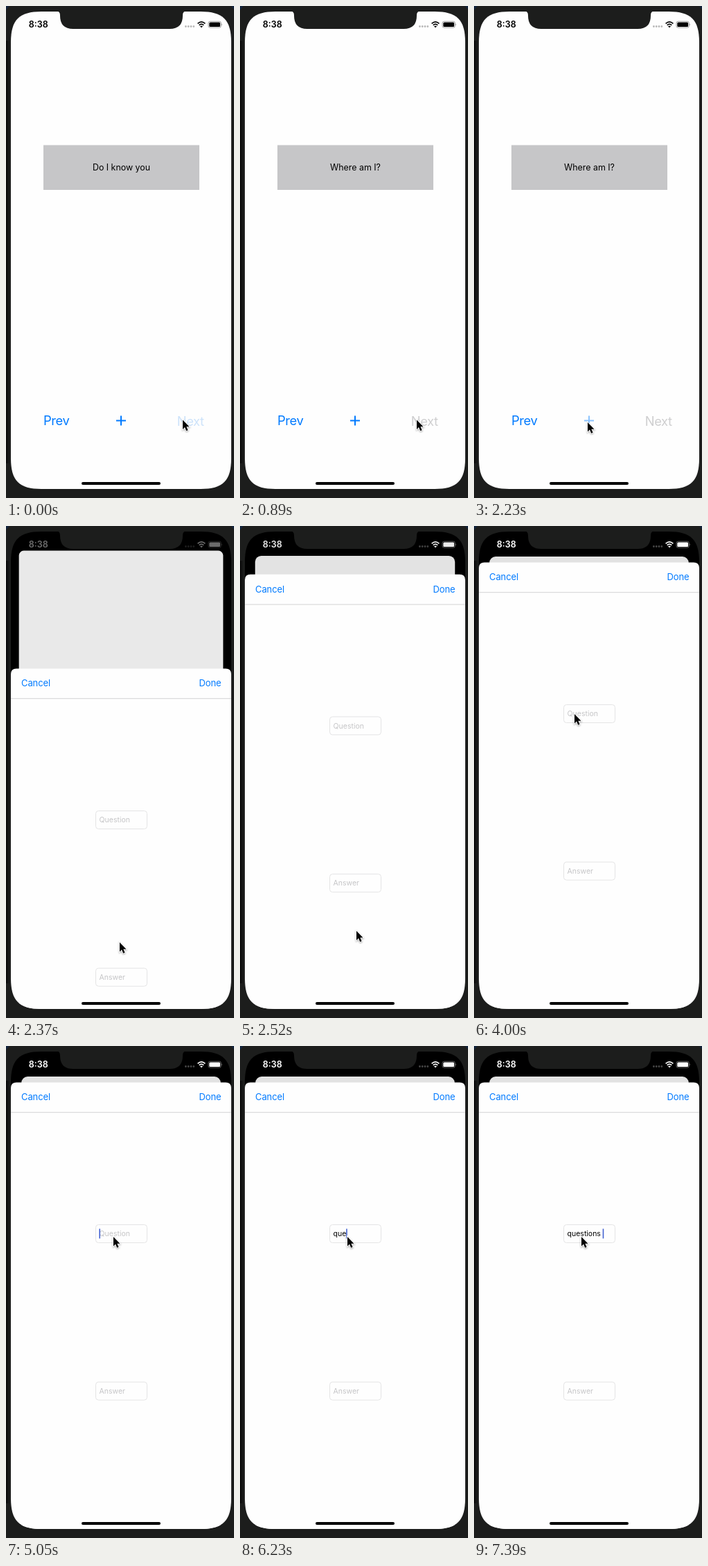
Animation of 329x709 px, one loop 7990 ms. Source, as an HTML page:

```html
<!DOCTYPE html>
<html lang="en">
<head>
<meta charset="utf-8">
<title>Flash cards</title>
<style>
  html, body { margin: 0; width: 100%; height: 100%; overflow: hidden; background: #1c1d1c; }
  svg { display: block; width: 100vw; height: 100vh; }
  text { font-family: Inter, Roboto, sans-serif; white-space: pre; }
  .link { fill: #007aff; }
  .big { font-size: 18.4px; letter-spacing: -.4px; }
  .bar { font-size: 13px; letter-spacing: -.1px; }
  .field { font-size: 10.5px; }
  .hint { fill: #c5c5c7; }
  .box { fill: #fefefe; stroke: #e4e4e5; }
  #pointer { filter: drop-shadow(0 1px 1px rgba(0, 0, 0, .35)); }
</style>
</head>
<body>
<svg viewBox="0 0 329 709">
  <defs>
    <clipPath id="screen"><path d="M7 52C7 20 19 8 51 8H281C313 8 325 20 325 52V652C325 684 313 696 281 696H51C19 696 7 684 7 652Z"/></clipPath>
    <linearGradient id="edge"><stop stop-color="#080808"/><stop offset="1" stop-color="#1c1d1c"/></linearGradient>
  </defs>
  <rect width="329" height="709" fill="#1c1d1c"/>
  <rect y="50" width="5" height="609" fill="url(#edge)"/>
  <path d="M0 0H5L0 6ZM329 0H325L329 5Z" fill="#12233a"/>

  <g clip-path="url(#screen)">
    <rect x="7" y="8" width="318" height="688"/>
    <rect id="back"/>
    <g id="home">
      <rect x="54" y="200.5" width="225" height="64.5" fill="#c6c6c8"/>
      <text id="card" x="166.5" y="237.3" font-size="12.4" text-anchor="middle"></text>
      <text class="link big" x="54" y="604">Prev</text>
      <path id="plus" d="M159 597.5H173M166 590.5V604.5" stroke="#007aff" stroke-width="2"/>
      <text id="next" class="big" x="246.7" y="605">Next</text>
    </g>
    <g id="sheet">
      <path d="M7 700V8Q7 0 15 0H317Q325 0 325 8V700Z" fill="#fefefe"/>
      <path d="M7 43.3H325" stroke="#d3d3d4"/>
      <text class="link bar" x="22" y="26">Cancel</text>
      <text class="link bar" x="310.5" y="26" text-anchor="end">Done</text>
      <rect class="box" x="129.5" y="205.1" width="74" height="26" rx="4"/>
      <text id="hint" class="field hint" x="134.6" y="221.8">Question</text>
      <text id="typed" class="field" x="134.6" y="221.8"></text>
      <rect id="caret" y="211" width="1.6" height="14" fill="#4463d2"/>
      <rect class="box" x="129.5" y="431.8" width="74" height="26" rx="4"/>
      <text class="field hint" x="134.6" y="448.5">Answer</text>
    </g>
  </g>
  <path d="M73 7Q78 8 78 13V14Q78 33 97 33H236Q255 33 255 14V13Q255 8 260 7Z" fill="#1c1d1c"/>

  <g id="status">
    <text x="32.7" y="31" font-size="12.5" font-weight="600">8:38</text>
    <path d="M259.4 29.5h.01M263.2 29.5h.01M267 29.5h.01M270.8 29.5h.01" stroke="currentColor" stroke-width="2.8" stroke-linecap="round" opacity=".27"/>
    <path d="M276.6 25.3Q282 20.4 287.4 25.3M278.7 27.6Q282 24.7 285.3 27.6" fill="none" stroke="currentColor" stroke-width="1.7"/>
    <path d="M280 29.2Q282 27.6 284 29.2L282 31.3Z"/>
    <rect x="292" y="22.2" width="18.4" height="9" rx="2.6" fill="none" stroke="currentColor" stroke-width=".8" opacity=".45"/>
    <rect x="293.3" y="23.5" width="15.8" height="6.4" rx="1.5"/>
    <path d="M311.4 25.2Q313 26.7 311.4 28.2Z" opacity=".5"/>
  </g>
  <rect x="109" y="686" width="114" height="4" rx="2"/>
  <path id="pointer" d="M0 0V13.4L3 10.6L5.2 15.7L7.6 14.7L5.4 9.7H9.5Z" stroke="#fff" stroke-width="1.8" paint-order="stroke"/>
</svg>
<script>
const LOOP = 7990, OPEN = 2370;
const $ = id => document.getElementById(id);

// Each track holds a value from its time until the next entry.
const POINTER = [
  [0, 255, 596.5], [1630, 243, 596], [1780, 210, 597], [1930, 178, 599], [2080, 164, 600],
  [2520, 168, 583.5], [2670, 167, 540], [2820, 161, 460], [2970, 154, 375], [3110, 149, 312],
  [3260, 147, 288], [3560, 149, 283], [4000, 145, 271], [5050, 155, 275]
];
const CARET = [[0, 0], [4600, 1], [5200, .5], [5340, 0], [5640, .5], [5790, 1]];
const WORD = "questions ";
const LETTERS = [
  [0, 0], [6080, 1], [6230, 3], [6520, 4], [6670, 5], [6820, 6],
  [6960, 7], [7110, 8], [7250, 9], [7390, 10]
];

const at = (track, t) => track.findLast(key => key[0] <= t);
const mix = (a, b, p) => a + (b - a) * p;
const rgb = (a, b, p) => `rgb(${a.map((v, i) => Math.round(mix(v, b[i], p)))})`;
const gray = v => `rgb(${[v, v, v].map(Math.round)})`;
const set = (id, attrs) => {
  for (const name in attrs) $(id).setAttribute(name, attrs[name]);
};

function drawHome(t) {
  $("card").textContent = t < 150 ? "Do I know you" : "Where am I?";
  const fade = Math.min(6, Math.max(0, Math.floor((t - 2) / 148))) / 6;
  set("next", { fill: rgb([205, 227, 250], [207, 207, 208], fade) });
  set("plus", { opacity: t >= 2230 ? .45 : 1 });
}

function drawSheet(t) {
  const open = t >= OPEN;
  const tick = Math.floor((t - OPEN) / 150) * 150;
  const rest = open ? 153 * Math.exp(-tick / 69) : 657;
  const p = 1 - rest / 657;
  const left = mix(7, 22.2, p);
  set("home", { visibility: open ? "hidden" : "visible" });
  set("sheet", { visibility: open ? "visible" : "hidden", transform: `translate(0 ${52.4 + rest})` });
  set("back", {
    x: left, y: mix(8, 44, p), width: 332 - 2 * left, height: 700,
    rx: 9 * p, fill: gray(254 - 28 * p)
  });
  const tone = gray(255 * p ** 3.27);
  set("status", { fill: tone, color: tone });
}

function drawField(t) {
  const count = at(LETTERS, t)[1];
  $("typed").textContent = WORD.slice(0, count);
  set("hint", { opacity: count ? 0 : 1 });
  const width = count ? $("typed").getComputedTextLength() : 0;
  set("caret", { x: 134.4 + width, opacity: at(CARET, t)[1] });
}

function draw(t) {
  drawHome(t);
  drawSheet(t);
  drawField(t);
  const [, x, y] = at(POINTER, t);
  set("pointer", { transform: `translate(${x} ${y})` });
}

const start = performance.now();
function loop(now) {
  draw(Math.max(0, now - start) % LOOP);
  requestAnimationFrame(loop);
}
draw(0);
requestAnimationFrame(loop);
</script>
</body>
</html>
```
